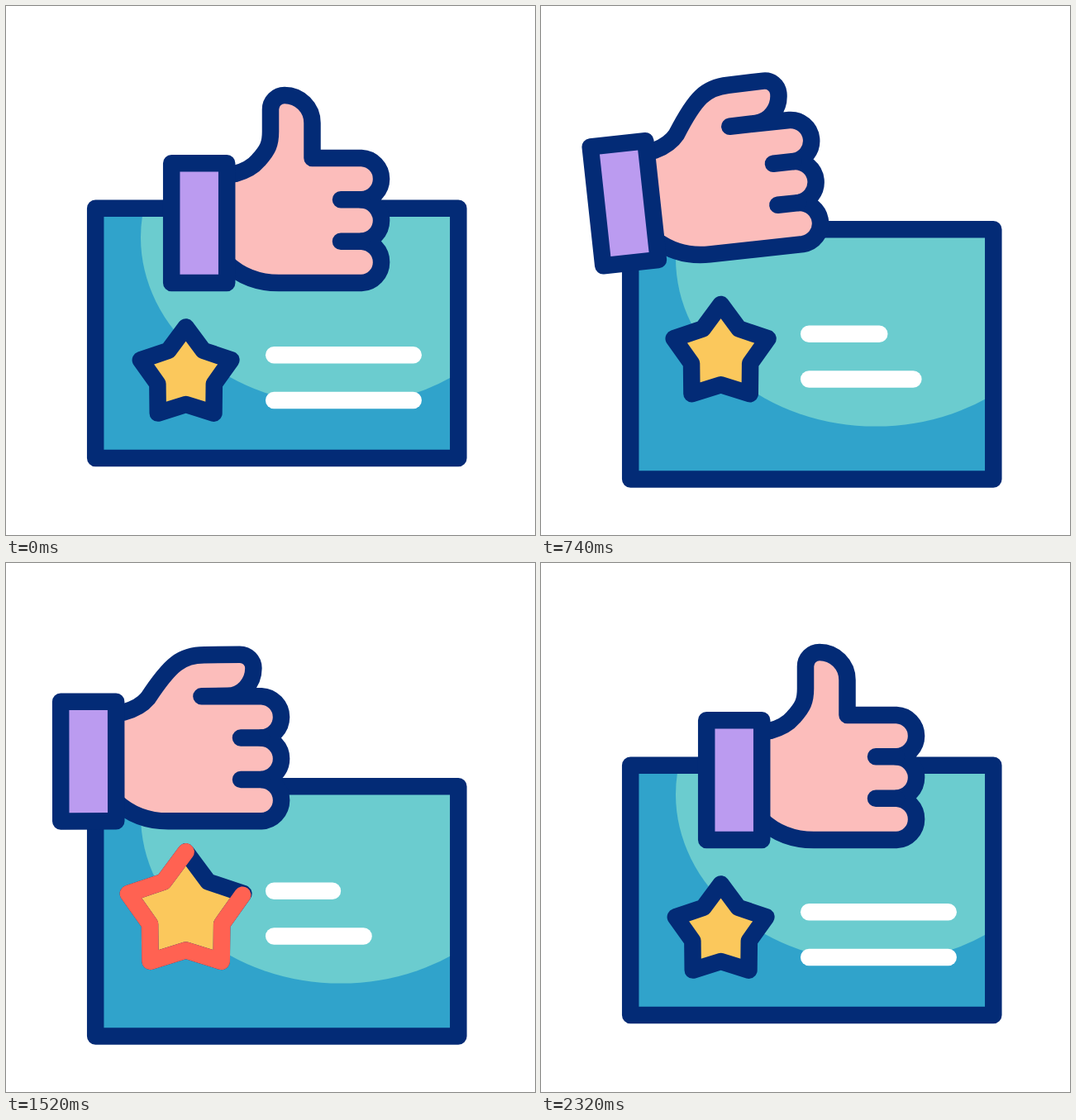
An HTML page for the animation above (2.4 s loop, 640 by 640 pixels).

```html
<!DOCTYPE html>
<html lang="en">
<head>
<meta charset="utf-8">
<title>Thumbs up card</title>
<style>
html, body { margin: 0; width: 100%; height: 100%; overflow: hidden; background: #fff; }
svg { display: block; width: 100%; height: 100%; }
.ink { stroke: #032b76; stroke-width: 20.5; stroke-linecap: round; stroke-linejoin: round; }
.white { stroke: #fff; }
.red { stroke: #ff6252; }
</style>
</head>
<body>
<svg viewBox="0 0 640 640">
  <defs><clipPath id="inside"><rect x="108" y="244.7" width="439.5" height="302.3"/></clipPath></defs>
  <g id="card">
    <rect x="108" y="244.7" width="439.5" height="302.3" fill="#30a3cb"/>
    <ellipse cx="405" cy="280" rx="242" ry="203" fill="#6bcccf" clip-path="url(#inside)"/>
    <rect class="ink" x="108.2" y="244.7" width="439.1" height="302.3" fill="none"/>
  </g>
  <g id="details">
    <path id="line1" class="ink white"/>
    <path id="line2" class="ink white"/>
    <path id="star" class="ink" fill="#fbc85c"/>
    <path id="trim" class="ink red" fill="none" pathLength="1"/>
  </g>
  <g id="hand">
    <path id="palm" class="ink" fill="#fcbdbb"/>
    <path id="gaps" class="ink" fill="none"/>
    <rect class="ink" x="200.2" y="190.3" width="67" height="144.7" fill="#bb9bf0"/>
  </g>
</svg>
<script>
const LOOP = 2400;
const set = (id, name, value) => document.getElementById(id).setAttribute(name, value);
const mix = (p, q, k) => p.map((v, i) => v + (q[i] - v) * k);

// Smooth step from 0 to 1 between times a and b
function ramp(t, a, b) {
  const u = Math.min(1, Math.max(0, (t - a) / (b - a)));
  return u * u * (3 - 2 * u);
}

// Rise over a..b, hold, fall over c..d
const hold = (t, a, b, c, d) => ramp(t, a, b) - ramp(t, c, d);

// Alternate between 0 and 1 at the given times
const swing = (t, ...times) => times.slice(1).reduce(
  (sum, end, i) => sum + (i % 2 ? -1 : 1) * ramp(t, times[i], end), 0);

// Curve from p to q that bends toward a corner
const bend = (p, corner, q, k) => `C${mix(p, corner, k)} ${mix(q, corner, k)} ${q}`;

function drawHand(fold) {
  const wrist = [277, 203], knuckle = [305.5, 186.5];
  const base = mix([320, 152], [374, 134], fold);
  const side = mix([320, 125], [417, 133.5], fold);
  const tip = mix([337, 108], [433.5, 150], fold);
  const back = mix([370.5, 141.5], [402, 183.5], fold);
  const thumb = bend(wrist, [296, 198], knuckle, 0.65) +
    bend(knuckle, mix([320, 170.5], [340, 134], fold), base, 0.8) + "L" + side +
    bend(side, mix([320, 108], [433.5, 133.5], fold), tip, 0.55) +
    bend(tip, mix([370.5, 108], [433.5, 183.5], fold), back, 0.55);

  const grow = 13 * fold, x = 430 + grow;
  const fingers = "a25.2 25.2 0 0 1 0 50.35".repeat(3);
  set("palm", "d", `M260 206L${wrist}${thumb}L370.5 184H${x}${fingers}H330C305 335 284 327 267 311Z`);
  set("gaps", "d", [234.35, 284.7].map(y => `M${405 + grow} ${y}H${x}`).join(""));
}

// Five-point star, counterclockwise from the top
function starPath(scale) {
  const points = Array.from({ length: 10 }, (_, i) => {
    const a = -Math.PI / 2 - i * Math.PI / 5, r = scale * (i % 2 ? 36 : 57.6);
    return [217.6 + r * Math.cos(a), 438 + 8 * scale + r * Math.sin(a)];
  });
  return "M" + points.join("L") + "Z";
}

function drawStar(scale, from, to) {
  const path = starPath(scale), len = to - from;
  set("star", "d", path);
  set("trim", "d", path);
  set("trim", "visibility", len > 0.001 ? "visible" : "hidden");
  set("trim", "stroke-dasharray", len > 0.999 ? "none" : `${len} 2`);
  set("trim", "stroke-dashoffset", -from);
}

function draw(t) {
  set("card", "transform", `translate(0 ${25.6 * hold(t, 200, 600, 1800, 2300)})`);

  set("details", "transform", `translate(0 ${-25.5 * hold(t, 200, 675, 1800, 2215)})`);
  set("line1", "d", `M324.2 422.3H${492.7 - 98 * swing(t, 200, 622, 1112, 1533, 2060)}`);
  set("line2", "d", `M324.2 477H${492.7 - 98 * swing(t, 550, 970, 1250, 1720, 2310)}`);
  drawStar(1 + 0.273 * hold(t, 640, 1066, 1800, 2300), ramp(t, 1710, 2295), ramp(t, 1060, 1710));

  const move = hold(t, 200, 600, 1800, 2100);
  const tilt = -10 * swing(t, 330, 633, 890, 1233, 1533);
  set("hand", "transform", `translate(${-134 * move} ${-22.6 * move}) rotate(${tilt} 222 252)`);
  drawHand(hold(t, 200, 600, 1800, 2300));
}

const start = performance.now();
function tick() {
  draw((performance.now() - start) % LOOP);
  requestAnimationFrame(tick);
}
tick();
</script>
</body>
</html>
```
